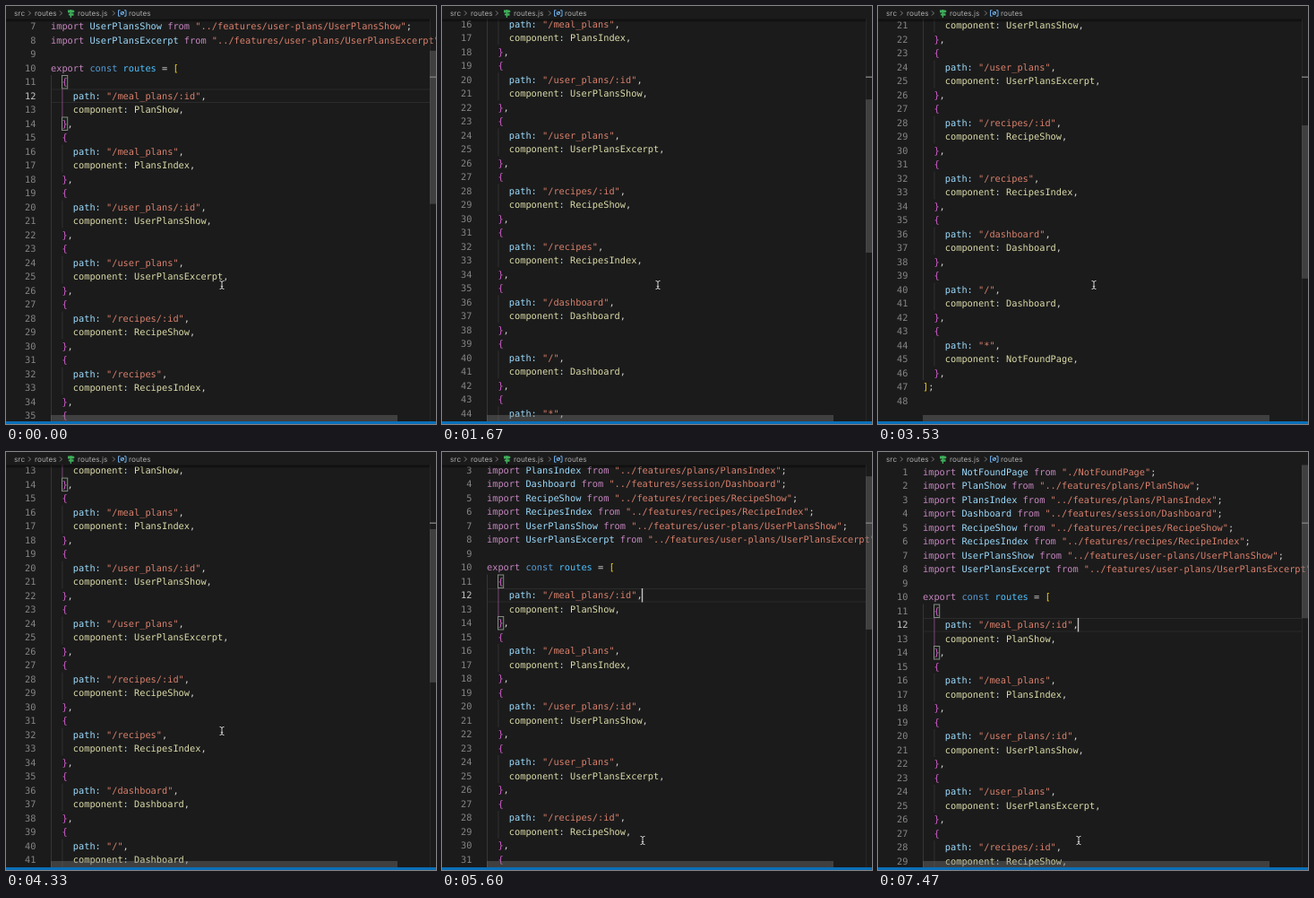
Animation of 480x466 px, one loop 7590 ms. Source, as an HTML page with a canvas:

```html
<!DOCTYPE html>
<html lang="en">
<head>
<meta charset="utf-8">
<title>Scrolling a routes file</title>
<style>
html, body { margin: 0; overflow: hidden; background: #1b1b1b; }
canvas { display: block; }
</style>
</head>
<body>
<canvas id="stage" width="480" height="466"></canvas>
<script>
const ctx = document.getElementById('stage').getContext('2d');
const LOOP = 7590, FPS = 15;
const TOP = 14.5, LINE = 15.5, CHAR = 6.2, LEFT = 50, BOTTOM = 463;
const VIEW = 450, TOTAL = 48 * LINE + VIEW - LINE;
const C = {
  bg: '#1b1b1b', keyword: '#c586c0', name: '#9cdcfe', text: '#d4d4d4', string: '#d9806c',
  type: '#dcdcaa', decl: '#569cd6', constant: '#4fc1ff', gold: '#ffd700', brace: '#d65fd0',
  number: '#858585', active: '#c6c6c6', slider: 'rgba(121,121,121,.4)'
};

// Source text: each line is a list of [column, text, colour]
function line(indent, ...tokens) {
  let col = indent;
  return tokens.map(([text, color]) => {
    const token = [col, text, C[color]];
    col += text.length;
    return token;
  });
}
const imports = [
  ['NotFoundPage', './NotFoundPage'],
  ['PlanShow', '../features/plans/PlanShow'],
  ['PlansIndex', '../features/plans/PlansIndex'],
  ['Dashboard', '../features/session/Dashboard'],
  ['RecipeShow', '../features/recipes/RecipeShow'],
  ['RecipesIndex', '../features/recipes/RecipeIndex'],
  ['UserPlansShow', '../features/user-plans/UserPlansShow'],
  ['UserPlansExcerpt', '../features/user-plans/UserPlansExcerpt']
];
const routes = [
  ['/meal_plans/:id', 'PlanShow'], ['/meal_plans', 'PlansIndex'],
  ['/user_plans/:id', 'UserPlansShow'], ['/user_plans', 'UserPlansExcerpt'],
  ['/recipes/:id', 'RecipeShow'], ['/recipes', 'RecipesIndex'],
  ['/dashboard', 'Dashboard'], ['/', 'Dashboard'], ['*', 'NotFoundPage']
];
const lines = [
  ...imports.map(([id, file]) => line(0, ['import ', 'keyword'], [id, 'name'],
    [' from ', 'keyword'], [`"${file}"`, 'string'], [';', 'text'])),
  [],
  line(0, ['export ', 'keyword'], ['const ', 'decl'], ['routes', 'constant'], [' = ', 'text'], ['[', 'gold']),
  ...routes.flatMap(([path, component]) => [
    line(2, ['{', 'brace']),
    line(4, ['path', 'name'], [': ', 'name'], [`"${path}"`, 'string'], [',', 'text']),
    line(4, ['component', 'type'], [': ', 'name'], [component, 'type'], [',', 'text']),
    line(2, ['}', 'brace'], [',', 'text'])
  ]),
  line(0, [']', 'gold'], [';', 'text']),
  []
];

// Scroll offset over time
const scrollKeys = [
  [0, 92.5], [350, 148], [800, 196.7], [1130, 197.5], [1200, 197.5], [1500, 222],
  [1800, 240], [1930, 240], [2400, 268], [3130, 310], [3530, 310.5], [3600, 310.5],
  [4330, 188], [5200, 33.5], [5600, 33], [5730, 33], [6130, 0], [LOOP, 0]
];
const slope = i => {
  const a = scrollKeys[i], b = scrollKeys[i + 1];
  return a && b ? (b[1] - a[1]) / (b[0] - a[0]) : 0;
};
const tangent = i => {
  const a = slope(i - 1), b = slope(i);
  return a * b > 0 ? 2 * a * b / (a + b) : 0;
};
// Monotone cubic through the keys
function scrollAt(t) {
  let i = 0;
  while (i < scrollKeys.length - 2 && t >= scrollKeys[i + 1][0]) i++;
  const [t0, a] = scrollKeys[i], [t1, b] = scrollKeys[i + 1];
  const d = t1 - t0, u = (t - t0) / d, s = u * u * (3 - 2 * u);
  return a + (b - a) * s
    + d * u * (1 - u) * ((1 - u) * tangent(i) - u * tangent(i + 1));
}

function rect(color, x, y, w, h) {
  ctx.fillStyle = color;
  ctx.fillRect(x, y, w, h);
}
function stroke(color, width, path) {
  ctx.strokeStyle = color;
  ctx.lineWidth = width;
  ctx.stroke(new Path2D(path));
}
function write(text, x, y, color, align = 'left') {
  ctx.textAlign = align;
  ctx.fillStyle = color;
  ctx.fillText(text, x, y);
}

function drawCode(scroll, caretOn) {
  const topOf = n => TOP + (n - 1) * LINE - scroll;
  ctx.save();
  ctx.beginPath();
  ctx.rect(0, TOP, 480, BOTTOM - TOP);
  ctx.clip();
  ctx.font = '10.3px "DejaVu Sans Mono", monospace';

  const inner = LEFT + 2 * CHAR;
  rect('#2b2b2b', LEFT, topOf(12), 423, 1);
  rect('#2b2b2b', LEFT, topOf(13) - 1, 423, 1);
  rect('#363636', LEFT, topOf(11), 1, 36 * LINE);
  routes.forEach((_, i) =>
    rect(i ? '#303030' : '#7a4777', inner, topOf(12 + 4 * i), 1, 2 * LINE));

  for (const n of [11, 14]) {
    rect('rgba(0,100,0,.1)', inner, topOf(n), CHAR, LINE);
    ctx.strokeStyle = '#888';
    ctx.lineWidth = 1;
    ctx.strokeRect(inner + .1, topOf(n) + .5, CHAR, LINE - 1);
  }
  lines.forEach((tokens, i) => {
    const top = topOf(i + 1), y = top + 11.4;
    if (top < -LINE || top > 466) return;
    write(i + 1, 33.4, y, i === 11 ? C.active : C.number, 'right');
    for (const [col, text, color] of tokens) write(text, LEFT + col * CHAR, y, color);
  });
  if (caretOn) rect('#c4c4c2', 222.8, topOf(12), 1.4, LINE);

  if (scroll > 0) {
    const shade = ctx.createLinearGradient(0, TOP, 0, TOP + 4);
    shade.addColorStop(0, 'rgba(0,0,0,.6)');
    shade.addColorStop(1, 'rgba(0,0,0,0)');
    rect(shade, 0, TOP, 473, 4);
  }
  ctx.restore();
}

function drawBars(scroll) {
  rect('#303030', 473, TOP, .6, BOTTOM - TOP);
  rect('#909090', 473, 78.6, 7, 1.2);
  rect(C.slider, 473, TOP + scroll * VIEW / TOTAL, 7, VIEW * VIEW / TOTAL - 1);
  rect(C.slider, LEFT, 456, 387, 7);
  rect('#0a6fb8', 0, BOTTOM, 480, 3);
}

function drawBreadcrumbs() {
  const gray = '#a9a9a9';
  ctx.font = '8.2px Inter, sans-serif';
  write('src', 9, 11, gray);
  write('routes', 32, 11, gray);
  write('routes.js', 80, 11, gray);
  write('routes', 137, 11, gray);
  for (const x of [25, 60, 119]) stroke('#8a8a8a', .9, `M${x} 5.5l2.5 2.5l-2.5 2.5`);
  // signpost
  rect('#3fae5a', 71.7, 4, 1.3, 9);
  ctx.fillStyle = '#3fae5a';
  ctx.fill(new Path2D('M69 4.5h6l1.8 1.5l-1.8 1.5h-6zM75.5 8.2h-4.5l-1.5 1.3l1.5 1.3h4.5z'));
  // variable symbol
  stroke('#75beff', .9, 'M127.5 4.8h-2v6.4h2M132 4.8h2v6.4h-2M128 8a1.8 1.6 0 1 0 3.6 0a1.8 1.6 0 1 0 -3.6 0M128 9.4l3.6 -2.8');
}

function drawPointer(t) {
  const u = Math.min(1, Math.max(0, (t - 5220) / 380)), s = u * u * (3 - 2 * u);
  ctx.save();
  ctx.translate(241 - 17 * s, 311 + 122 * s);
  const beam = 'M-2.5 -4.6Q0 -4.6 0 -3V3Q0 4.6 -2.5 4.6M2.5 -4.6Q0 -4.6 0 -3M0 3Q0 4.6 2.5 4.6M-1.2 1.6h2.4';
  stroke('#111', 2.2, beam);
  stroke('#d8d8d8', 1, beam);
  ctx.restore();
}

function draw(now) {
  const t = Math.floor((now % LOOP + 4) * FPS / 1000) * 1000 / FPS;
  const scroll = scrollAt(t), beat = t % 1000;
  ctx.textRendering = 'geometricPrecision';
  ctx.fontKerning = 'none';
  rect(C.bg, 0, 0, 480, 466);
  drawCode(scroll, beat > 460 && beat < 990);
  drawBars(scroll);
  drawBreadcrumbs();
  drawPointer(t);
}

const start = performance.now();
function frame() {
  draw(performance.now() - start);
  requestAnimationFrame(frame);
}
frame();
</script>
</body>
</html>
```
